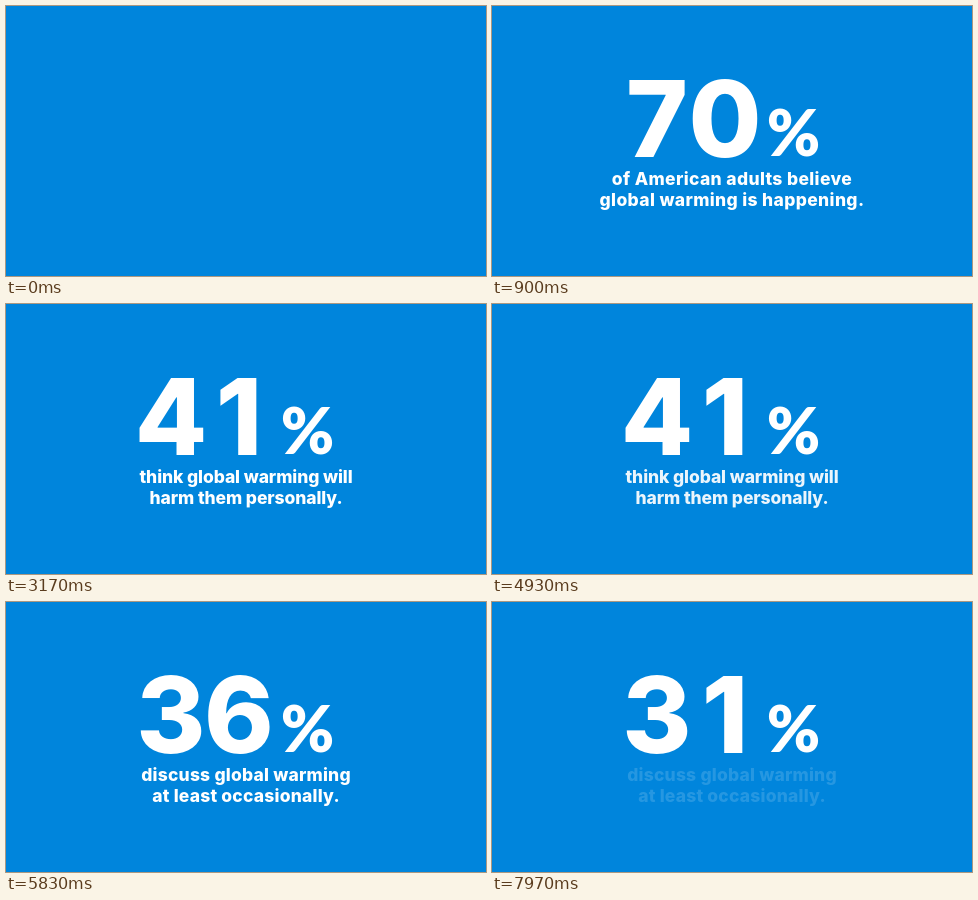
Recreate the animation shown at these times as an HTML page. Size 480x270 px, loop 8000 ms.

```html
<!DOCTYPE html>
<html lang="en">
<head>
<meta charset="utf-8">
<title>Climate opinion counter</title>
<style>
html, body { margin: 0; width: 100%; height: 100%; overflow: hidden; background: #0085dc; }
svg { display: block; width: 100%; height: 100%; }
text { font-family: Inter, "Noto Sans", sans-serif; font-optical-sizing: none; fill: #fff; text-anchor: middle; }
.digit { font-size: 105.5px; font-weight: 850; }
.percent { font-family: Lato, Inter, sans-serif; font-size: 64px; font-weight: 900; }
.caption { font-size: 17.5px; font-weight: 800; }
</style>
</head>
<body>
<svg viewBox="0 0 480 270">
  <g id="number">
    <text class="digit" x="165" y="151"></text>
    <text class="digit" x="233" y="151"></text>
    <text class="percent" x="301.5" y="150">%</text>
  </g>
  <g id="caption">
    <text class="caption" x="240" y="179"></text>
    <text class="caption" x="240" y="200"></text>
  </g>
</svg>
<script>
const LOOP = 8000, INTRO = 440, COUNT_TIME = 930;
const slides = [
  { value: 70, spacing: 0.35, lines: ["of American adults believe", "global warming is happening."] },
  { value: 41, spacing: -0.1, lines: ["think global warming will", "harm them personally."] },
  { value: 36, spacing: 0.2, lines: ["discuss global warming", "at least occasionally."] },
  { value: 18, spacing: 0, lines: ["", ""] }
];
const changes = [2200, 4900, 7630];

const number = document.getElementById("number");
const caption = document.getElementById("caption");
const digits = number.querySelectorAll(".digit");
const rows = caption.querySelectorAll("text");
const ramp = (t, start, length) => Math.min(1, Math.max(0, (t - start) / length));

function draw(t) {
  const intro = ramp(t, INTRO, 450);
  let value = slides[0].value, slide = slides[0], fade = intro;

  changes.forEach((start, i) => {
    if (t < start) return;
    const from = slides[i], to = slides[i + 1], dt = t - start;
    const progress = ramp(dt, 0, COUNT_TIME) ** 1.18;
    value = Math.ceil(from.value + (to.value - from.value) * progress);
    slide = dt < 430 ? from : to;
    fade = dt < 430 ? 1 - ramp(dt, 0, 400) : ramp(dt, 460, 440);
  });

  number.style.opacity = intro;
  caption.style.opacity = fade;
  [...String(value)].forEach((digit, i) => digits[i].textContent = digit);
  rows.forEach((row, i) => {
    row.textContent = slide.lines[i];
    row.style.letterSpacing = slide.spacing + "px";
  });
}

const begin = performance.now();
function tick() {
  draw((performance.now() - begin) % LOOP);
  requestAnimationFrame(tick);
}
tick();
</script>
</body>
</html>
```
